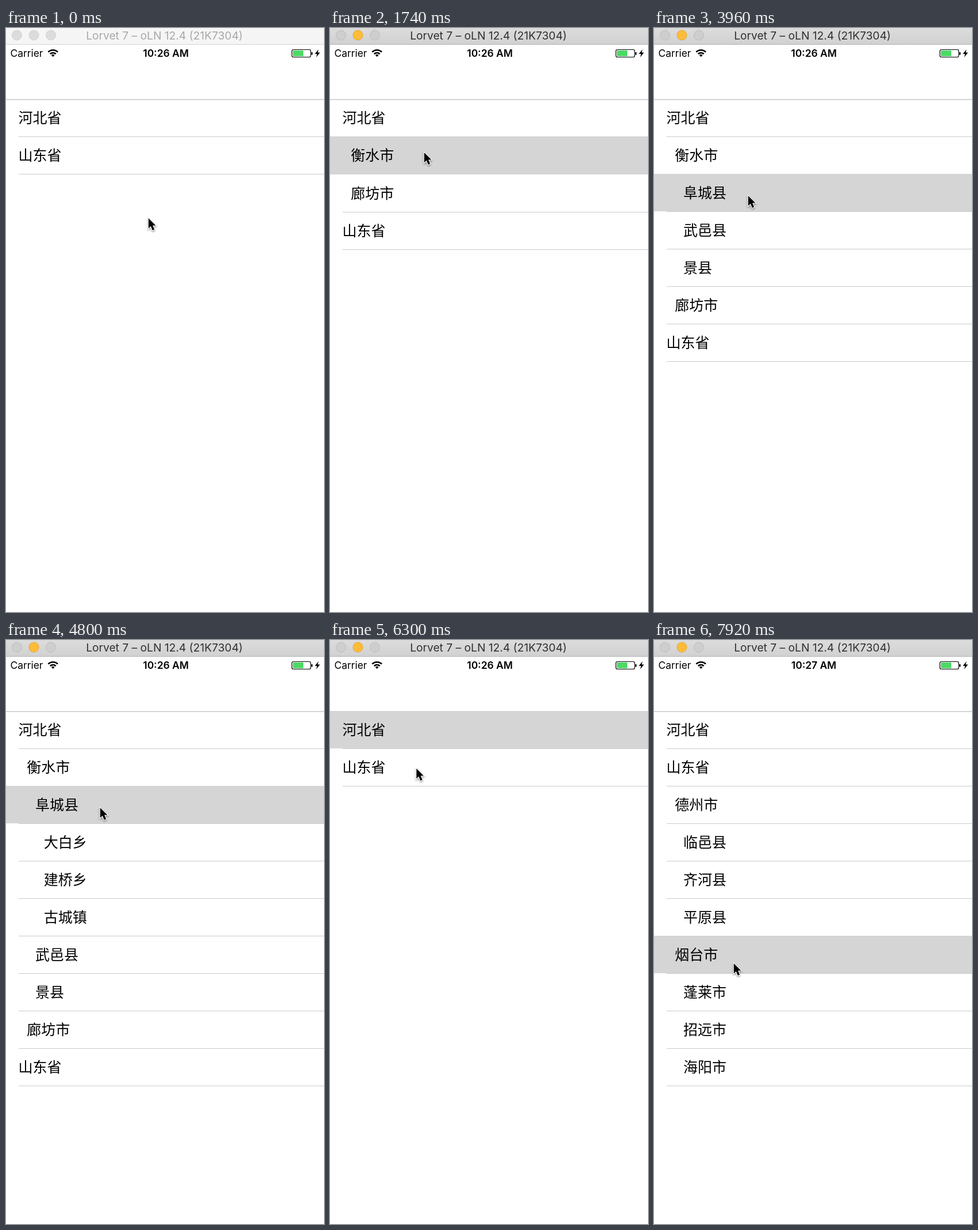
Write an HTML page with a canvas that moves like this. It is 553 px wide and 1013 px high and loops after 8000 ms.

```html
<!DOCTYPE html>
<html lang="zh-CN">
<head>
<meta charset="utf-8">
<title>Expandable list</title>
<style>
html, body { margin: 0; width: 100%; height: 100%; overflow: hidden; background: #fff; }
canvas { display: block; }
</style>
</head>
<body>
<canvas id="stage" width="553" height="1013"></canvas>
<script>
const ctx = document.getElementById('stage').getContext('2d');
const W = 553, H = 1013, LOOP = 8000, TOP = 123.4, ROW = 65.05, SLIDE = 250;
const ACTIVE_AT = 480, MINUTE_AT = 7400;
const LATIN = 'Inter, "Noto Sans", sans-serif';
const CJK = '25px "Noto Sans CJK SC", "Noto Sans CJK", sans-serif';

// taps: times at which the row is tapped, alternately opening and closing it
const node = (name, taps = [], kids = []) => ({ name, taps, kids });
const leaves = names => names.split(' ').map(n => node(n));
const tree = [
  node('河北省', [540, 5630], [
    node('衡水市', [1730], [
      node('阜城县', [2930, 3600, 4360], leaves('大白乡 建桥乡 古城镇')),
      ...leaves('武邑县 景县')
    ]),
    node('廊坊市')
  ]),
  node('山东省', [6360], [
    node('德州市', [6984], leaves('临邑县 齐河县 平原县')),
    node('烟台市', [7600], leaves('蓬莱市 招远市 海阳市'))
  ])
];

// pointer stops: time, x, y
const path = [
  [0, 247, 329], [60, 247, 329], [300, 165, 156], [1200, 165, 156], [1500, 163, 215],
  [2100, 163, 215], [2400, 163, 290], [5160, 163, 290], [5460, 151, 162],
  [5960, 151, 162], [6200, 149.5, 222], [6660, 149.5, 222], [6880, 149.5, 283],
  [7320, 149.5, 283], [7540, 138, 560], [8000, 138, 560]
];

const clamp = v => Math.max(0, Math.min(1, v));
const ease = v => { v = clamp(v); return v * v * (3 - 2 * v); };

function openness(n, t) {
  const past = n.taps.filter(x => x <= t);
  if (!past.length) return 0;
  const p = ease((t - past[past.length - 1]) / SLIDE);
  return past.length % 2 ? p : 1 - p;
}

function lastTap(list, t) {
  let best = { time: -1, row: null };
  for (const n of list) {
    for (const time of n.taps) if (time <= t && time > best.time) best = { time, row: n };
    const sub = lastTap(n.kids, t);
    if (sub.time > best.time) best = sub;
  }
  return best;
}

const heightOf = (n, t) => ROW + openness(n, t) * kidsHeight(n, t);
const kidsHeight = (n, t) => n.kids.reduce((sum, k) => sum + heightOf(k, t), 0);

function text(str, x, y, font, color = '#000', align = 'left') {
  ctx.font = font;
  ctx.fillStyle = color;
  ctx.textAlign = align;
  ctx.fillText(str, x, y);
}

function rect(x, y, w, h, color) {
  ctx.fillStyle = color;
  ctx.fillRect(x, y, w, h);
}

function drawRow(n, y, depth, t, tap) {
  const on = n === tap.row, pressed = on && t - tap.time < SLIDE;
  const top = Math.floor(y), bottom = Math.floor(y + ROW);
  if (on) rect(0, top, W, bottom - top, '#d5d5d5');
  rect(pressed ? 0 : 22, bottom, W, 1, pressed ? '#d5d5d5' : '#cbcbcd');
  text(n.name, 21.6 + 14.75 * depth, y + 41.1, CJK);
}

function drawList(list, y, depth, t, tap) {
  for (const n of list) {
    const p = openness(n, t), h = heightOf(n, t);
    drawRow(n, y, depth, t, tap);
    if (p > 0) {
      const top = Math.floor(y + ROW);
      ctx.save();
      ctx.beginPath();
      ctx.rect(0, top, W, Math.floor(y + h) + 1 - top);
      ctx.clip();
      ctx.globalAlpha *= p;
      drawList(n.kids, y + ROW, depth + 1, t, tap);
      ctx.restore();
    }
    y += h;
  }
  // the bottom edge travels with the last row
  rect(22, Math.floor(y), W, 1, '#cbcbcd');
}

function drawTitleBar(active) {
  const shade = ctx.createLinearGradient(0, 0, 0, 28);
  shade.addColorStop(0, active ? '#dcdcdc' : '#f6f6f6');
  shade.addColorStop(1, active ? '#d1d1d1' : '#f5f5f5');
  rect(0, 0, W, 28, shade);
  rect(0, 28, W, 1, active ? '#b3b3b3' : '#d4d4d4');
  [19, 48.5, 78].forEach((x, i) => {
    const yellow = active && i === 1;
    ctx.beginPath();
    ctx.arc(x, 12.5, 8.5, 0, 7);
    ctx.fillStyle = yellow ? '#fdbc38' : active ? '#cecece' : '#dcdcdc';
    ctx.strokeStyle = yellow ? '#e2a535' : active ? '#bcbcbc' : '#d0d0d0';
    ctx.lineWidth = 1;
    ctx.fill();
    ctx.stroke();
  });
  text('Lorvet 7 – oLN 12.4 (21K7304)', 275.5, 20, '19.2px ' + LATIN, active ? '#303030' : '#a8a8a8', 'center');
}

function polygon(pts) {
  ctx.beginPath();
  for (let i = 0; i < pts.length; i += 2) ctx.lineTo(pts[i], pts[i + 1]);
  ctx.closePath();
}

function drawStatus(t) {
  text('Carrier', 7.5, 50, '17.4px ' + LATIN);
  text(t < MINUTE_AT ? '10:26 AM' : '10:27 AM', 278, 50, '600 17.4px ' + LATIN, '#000', 'center');

  ctx.strokeStyle = '#000';
  for (const r of [2, 7, 11.8]) {
    ctx.beginPath();
    ctx.arc(81.7, 50, r, -Math.PI * 0.75, -Math.PI * 0.25);
    ctx.lineWidth = r === 2 ? 4 : 2.6;
    ctx.stroke();
  }

  ctx.lineWidth = 1.2;
  ctx.beginPath();
  ctx.roundRect(497.2, 37.5, 32.6, 13, 2.5);
  ctx.stroke();
  rect(499, 39, 18, 10, '#4cd964');
  rect(531, 42, 2, 4.5, '#000');
  polygon([543.5, 37, 537, 45, 541, 45, 539.3, 51, 546, 42.5, 542, 42.5]);
  ctx.fillStyle = '#000';
  ctx.fill();
}

function drawPointer(t) {
  const i = Math.max(1, path.findIndex(k => k[0] > t));
  const [t0, x0, y0] = path[i - 1], [t1, x1, y1] = path[i];
  const p = ease((t - t0) / (t1 - t0));
  ctx.save();
  ctx.translate(x0 + (x1 - x0) * p + 0.8, y0 + (y1 - y0) * p + 1);
  polygon([0, 0, 0, 17.5, 4, 13.8, 7, 21, 10.3, 19.6, 7.3, 12.6, 12.6, 12.4]);
  ctx.lineWidth = 2.4;
  ctx.strokeStyle = '#fff';
  ctx.shadowColor = 'rgba(0,0,0,.45)';
  ctx.shadowBlur = 3;
  ctx.shadowOffsetY = 1.5;
  ctx.stroke();
  ctx.shadowColor = 'transparent';
  ctx.fillStyle = '#000';
  ctx.fill();
  ctx.restore();
}

function draw(now) {
  const t = now % LOOP;
  rect(0, 0, W, H, '#fff');
  drawList(tree, TOP, 0, t, lastTap(tree, t));
  rect(0, 123, W, 1, '#dcdcdc');
  rect(0, 124, W, 1, '#cfcfcf');
  drawTitleBar(t >= ACTIVE_AT);
  drawStatus(t);
  drawPointer(t);
  requestAnimationFrame(draw);
}
requestAnimationFrame(draw);
</script>
</body>
</html>
```
